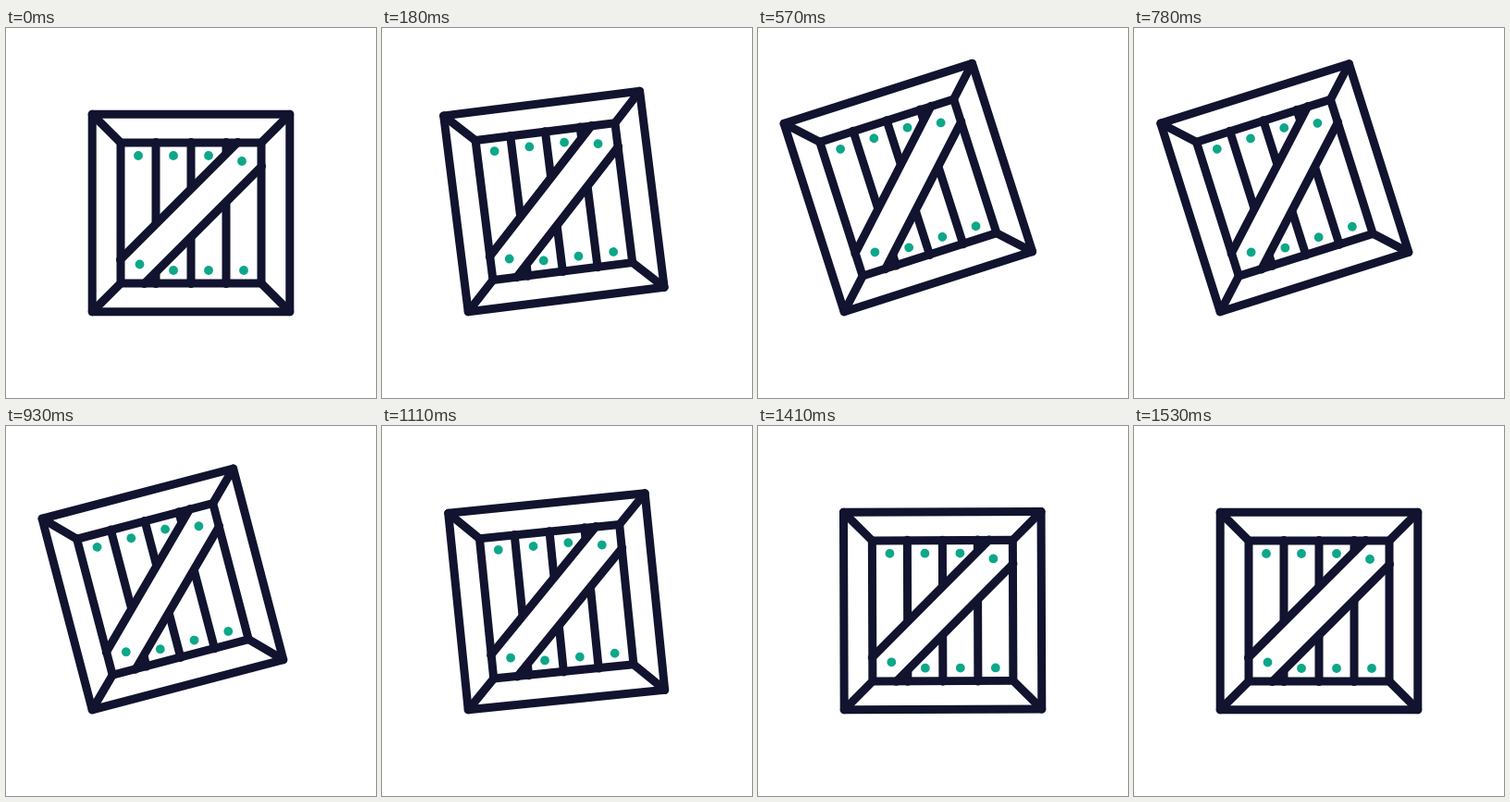
An HTML page with a canvas for the animation above (1.56 s loop, 400 by 400 pixels).

```html
<!DOCTYPE html>
<html>
<head>
<meta charset="utf-8">
<style>
  html, body { margin: 0; width: 100%; height: 100%; overflow: hidden; background: #fff; }
  canvas { display: block; width: 400px; height: 400px; }
</style>
</head>
<body>
<canvas id="stage" width="400" height="400"></canvas>
<script>
const ctx = document.getElementById('stage').getContext('2d');
const LOOP = 1560, PEAK = 660, REST = 1510, TILT = 18;
const INK = '#11132f', GREEN = '#0ca789';
const OUT = 93.2, OUT2 = 400 - OUT;
const IN = 124, IN2 = 400 - IN;
const NAILS = [
  [143, 138], [181, 138], [219, 138], [255, 144],
  [144.5, 255.5], [181, 262], [219, 262], [257, 262]
];

// Cubic timing curve through (x1, 0) and (x2, 1).
function ease(x, x1, x2) {
  let lo = 0, hi = 1;
  for (let i = 0; i < 30; i++) {
    const s = (lo + hi) / 2, r = 1 - s;
    if (3 * r * r * s * x1 + 3 * r * s * s * x2 + s * s * s < x) lo = s;
    else hi = s;
  }
  return lo * lo * (3 - 2 * lo);
}

function tiltAt(t) {
  if (t < PEAK) return TILT * ease(t / PEAK, 0.23, 0.31);
  if (t < REST) return TILT * (1 - ease((t - PEAK) / (REST - PEAK), 0.57, 0.315));
  return 0;
}

function line(x1, y1, x2, y2) {
  ctx.beginPath();
  ctx.moveTo(x1, y1);
  ctx.lineTo(x2, y2);
  ctx.stroke();
}

function drawCrate() {
  ctx.strokeStyle = INK;
  ctx.lineWidth = 9;
  ctx.lineCap = ctx.lineJoin = 'round';

  for (const x of [162, 200, 238]) line(x, IN - 0.5, x, IN2 + 0.5);

  // Diagonal plank
  ctx.fillStyle = '#fff';
  ctx.beginPath();
  ctx.moveTo(IN, 250);
  ctx.lineTo(250, IN);
  ctx.lineTo(IN2, IN);
  ctx.lineTo(IN2, 150);
  ctx.lineTo(150, IN2);
  ctx.lineTo(IN, IN2);
  ctx.fill();
  line(IN - 0.5, 250.5, 250.5, IN - 0.5);
  line(149.5, IN2 + 0.5, IN2 + 0.5, 149.5);

  // Frame
  ctx.strokeRect(IN, IN, IN2 - IN, IN2 - IN);
  ctx.strokeRect(OUT, OUT, OUT2 - OUT, OUT2 - OUT);
  line(OUT, OUT, IN, IN);
  line(OUT2, OUT, IN2, IN);
  line(OUT, OUT2, IN, IN2);
  line(OUT2, OUT2, IN2, IN2);

  ctx.fillStyle = GREEN;
  for (const [x, y] of NAILS) {
    ctx.beginPath();
    ctx.arc(x, y, 4.9, 0, Math.PI * 2);
    ctx.fill();
  }
}

function render(now) {
  ctx.fillStyle = '#fff';
  ctx.fillRect(0, 0, 400, 400);
  ctx.save();
  ctx.translate(OUT, OUT2);
  ctx.rotate(-tiltAt(now % LOOP) * Math.PI / 180);
  ctx.translate(-OUT, -OUT2);
  drawCrate();
  ctx.restore();
}

const start = performance.now();
function tick() {
  render(performance.now() - start);
  requestAnimationFrame(tick);
}
tick();
</script>
</body>
</html>
```
